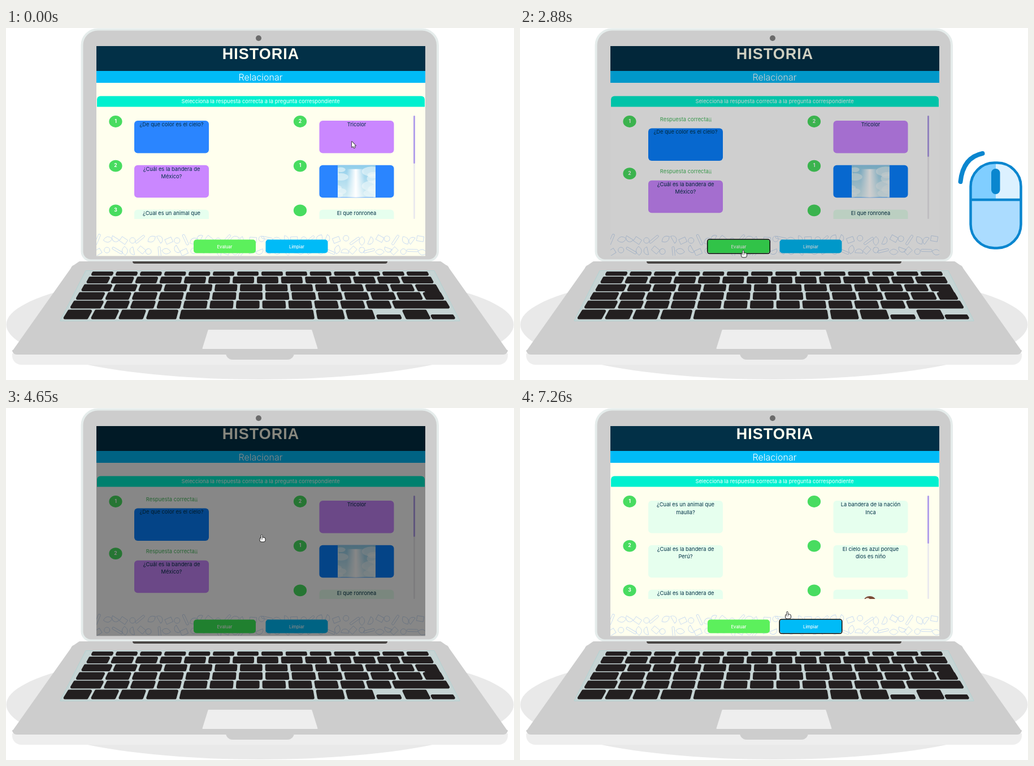
An HTML page with a canvas that plays this animation: 899 px wide and 623 px high, repeating every 7.29 s.

```html
<!DOCTYPE html>
<html lang="es">
<head>
<meta charset="utf-8">
<title>Relacionar</title>
<style>
html, body { margin: 0; width: 100%; height: 100%; overflow: hidden; background: #fff; }
canvas { display: block; }
</style>
</head>
<body>
<canvas id="stage" width="899" height="623"></canvas>
<script>
const W = 899, H = 623, LOOP = 7290;
const stage = document.getElementById('stage').getContext('2d');
let c = stage;

const SANS = 'Inter, "Open Sans", sans-serif';
const TITLE = '"Liberation Sans", Arial, sans-serif';
const INK = '#023047', CREAM = '#ffffee', CYAN = '#00bbf7', GREEN = '#48dc60';
const PURPLE = '#ca87ff', MINT = '#e6ffee', SHELL = '#cdcdcd', RIM = '#e5eceb', KEY = '#231f20';
const LIT = { page: CREAM, blue: '#2a85ff', go: '#5cf05c' };
const DIM = { page: '#fff', blue: '#0880ff', go: '#3cf058' };

// Drawing helpers

function box(x0, y0, x1, y1, r, fill, stroke, lw = 1) {
  c.beginPath();
  c.roundRect(x0, y0, x1 - x0, y1 - y0, r);
  if (fill) { c.fillStyle = fill; c.fill(); }
  if (stroke) { c.strokeStyle = stroke; c.lineWidth = lw; c.stroke(); }
}

function poly(pts, fill, stroke, lw = 1) {
  c.beginPath();
  pts.forEach(p => c.lineTo(...p));
  c.closePath();
  c.lineJoin = 'round';
  c.strokeStyle = stroke;
  c.lineWidth = lw;
  c.stroke();
  c.fillStyle = fill;
  c.fill();
}

// Symmetric trapezoid around a vertical axis
function trapezoid(x, y0, half0, y1, half1, fill, stroke, lw) {
  poly([[x - half0, y0], [x + half0, y0], [x + half1, y1], [x - half1, y1]], fill, stroke, lw);
}

function oval(x, y, rx, ry, fill) {
  c.beginPath();
  c.ellipse(x, y, rx, ry, 0, 0, 7);
  c.fillStyle = fill;
  c.fill();
}

function text(s, x, y, size, fill, weight = 400, align = 'center', family = SANS) {
  c.font = `${weight} ${size}px ${family}`;
  c.textAlign = align;
  c.fillStyle = fill;
  c.fillText(s, x, y + size * 0.355);
}

function line(x0, y0, x1, y1, stroke, lw = 1) {
  c.beginPath();
  c.moveTo(x0, y0);
  c.lineTo(x1, y1);
  c.strokeStyle = stroke;
  c.lineWidth = lw;
  c.stroke();
}

function clipped(x, y, w, h, draw) {
  c.save();
  c.beginPath();
  c.rect(x, y, w, h);
  c.clip();
  draw();
  c.restore();
}

function layer(draw) {
  const cv = document.createElement('canvas');
  cv.width = W;
  cv.height = H;
  c = cv.getContext('2d');
  draw();
  c = stage;
  return cv;
}

function random(seed) {
  return () => (seed = seed * 16807 % 2147483647) / 2147483647;
}

const ramp = (t, a, b) => Math.min(1, Math.max(0, (t - a) / (b - a)));
const easeOut = k => 1 - (1 - k) ** 2;
const within = (t, a, b) => t >= a && t < b;

// Laptop

const AXIS = 449.5;

// Key leaning with the perspective of the deck
function key(x0, x1, y0, y1) {
  const mid = (y0 + y1) / 2, at = (x, y) => [x + (x - AXIS) * 0.0018 * (y - mid), y];
  const r = 2.5;
  poly([at(x0 + r, y0 + r), at(x1 - r, y0 + r), at(x1 - r, y1 - r), at(x0 + r, y1 - r)], KEY, KEY, 2 * r);
}

// Units give the relative key widths; low(i) marks half-height keys
function keyRow(y0, y1, units, low = () => false) {
  const gap = 5, half = 298 + 0.64 * ((y0 + y1) / 2 - 435);
  const unit = (2 * half + gap) / units.reduce((a, b) => a + b);
  let x = AXIS - half;
  units.forEach((u, i) => {
    key(x, x + u * unit - gap, low(i) ? (y0 + y1) / 2 : y0, y1);
    x += u * unit;
  });
}

const units = (first, n, last) => [first, ...Array(n).fill(1), last];

function keyboard() {
  trapezoid(AXIS, 430, 308, 518, 353, '#c6d4d4', '#b4d2d2', 2);
  keyRow(431, 438.5, units(1, 12, 1));
  keyRow(440, 452, units(1, 12, 1.37));
  keyRow(453.5, 466, units(1.25, 12, 0.95));
  keyRow(467.5, 481, units(1.1, 12, 0.8));
  key(742, 768, 454, 481);
  keyRow(482.5, 496.5, units(1.27, 11, 2.2));
  keyRow(498.5, 515.5, [1, 1, 1, 1.2, 5, 1.1, 1.1, 1, 1, 0.95], i => i === 7 || i === 9);
}

const laptop = layer(() => {
  c.fillStyle = '#fff';
  c.fillRect(0, 0, W, H);
  oval(AXIS, 525, 449, 97, '#e9e9e9');
  box(134.5, 2.5, 764, 411.5, [28, 28, 16, 16], SHELL, RIM, 4);
  oval(447, 18, 5, 5, '#6b6b6b');
  trapezoid(AXIS, 415, 319, 424, 332, SHELL, SHELL, 4);
  trapezoid(AXIS, 422, 330, 572, 436, SHELL, SHELL, 4);
  box(224, 413, 675, 417, [0, 0, 4, 4], '#4a4644');
  keyboard();
  trapezoid(AXIS, 535, 91, 567, 101, '#eee', '#eee', 2);
  box(11, 576, 888, 596, [0, 0, 16, 16], '#eee');
  box(11, 570, 888, 578, [0, 0, 8, 8], SHELL);
  box(389, 574, 510, 587, [0, 0, 12, 12], SHELL);
});

// Faint school doodles along the bottom of the page

const SHAPES = [
  () => c.roundRect(-10, -2, 20, 4, 2),
  () => c.arc(0, 0, 5, 0, 6.3),
  () => c.rect(-6, -5, 12, 9),
  () => { c.arc(0, 3, 7, Math.PI, 0); c.closePath(); },
  () => { c.moveTo(-8, 0); c.quadraticCurveTo(0, -10, 8, 0); c.quadraticCurveTo(0, 10, -8, 0); }
];

const doodles = layer(() => clipped(160, 363, 582, 40, () => {
  const rnd = random(11);
  c.strokeStyle = '#c8daf2';
  c.lineWidth = 0.9;
  for (let i = 0; i < 78; i++) {
    c.save();
    c.translate(162 + (i >> 1) * 15 + rnd() * 6, 372 + (i % 2) * 20 + rnd() * 5);
    c.rotate(rnd() * 6.3);
    c.beginPath();
    SHAPES[i * 7 % SHAPES.length]();
    c.stroke();
    c.restore();
  }
}));

// Page

const rowY = i => 164 + i * 78.7;

function bullet(x, y, label) {
  oval(x, y, 11.6, 10.4, GREEN);
  text(label, x, y - 1, 8.6, '#fff', 700);
}

function card(x, y, fill, lines) {
  box(x, y, x + 132, y + 57.5, 6, fill);
  lines.forEach((s, i) => text(s, x + 66, y + 6.5 + i * 13.8, 9.35, INK));
}

// Sky with clouds and a beam of light
function sky(x, y, w, h) {
  clipped(x, y, w, h, () => {
    const rnd = random(5), air = c.createLinearGradient(0, y, 0, y + h);
    air.addColorStop(0, '#8fcdea');
    air.addColorStop(1, '#d6eef4');
    c.fillStyle = air;
    c.fillRect(x, y, w, h);
    for (let i = 0; i < 16; i++) {
      const side = i % 2 ? w : 0, r = 6 + rnd() * 8;
      oval(x + side + (rnd() - 0.5) * 34, y + 8 + i * 3.2, r * 1.4, r * 0.7, '#eef9fa99');
    }
    const beam = c.createLinearGradient(x + 16, 0, x + 48, 0);
    beam.addColorStop(0, '#fff0');
    beam.addColorStop(0.5, '#fff');
    beam.addColorStop(1, '#fff0');
    c.fillStyle = beam;
    c.fillRect(x + 16, y + 7, 32, h);
  });
}

function rightCards(fresh, tone) {
  const x = 554.5, labels = fresh ? ['', '', ''] : ['2', '1', ''];
  labels.forEach((s, i) => bullet(520.5, rowY(i) + 1.5, s));
  if (fresh) {
    card(x, rowY(0), MINT, ['La bandera de la nación', 'Inca']);
    card(x, rowY(1), MINT, ['El cielo es azul porque', 'dios es niño']);
    card(x, rowY(2), MINT, []);
    oval(619, 340, 10, 7, '#7a4a35');
    oval(615, 340, 4, 4, '#e8ddd0');
  } else {
    card(x, rowY(0), PURPLE, ['Tricolor']);
    card(x, rowY(1), tone.blue, []);
    sky(587, rowY(1), 67, 57);
    card(x, rowY(2), MINT, ['El que ronronea']);
  }
}

function leftCards(checked, fresh, tone) {
  const shift = checked ? 13.5 : 0;
  const items = fresh
    ? [[MINT, '¿Cual es un animal que', 'maulla?'], [MINT, '¿Cual es la bandera de', 'Perú?'], [MINT, '¿Cuál es la bandera de']]
    : [[tone.blue, '¿De que color es el cielo?'], [PURPLE, '¿Cuál es la bandera de', 'México?'], [MINT, '¿Cual es un animal que']];
  items.forEach(([fill, ...lines], i) => {
    const y = rowY(i) + i * shift;
    bullet(194, y + 1.5, String(i + 1));
    if (checked) text('Respuesta correcta¡¡', 293.5, y - 2.5, 9.35, '#45b95c');
    card(227, y + shift, fill, lines);
  });
}

function button(x, fill, label, focus) {
  box(x, 374.5, x + 110, 398.5, 5, fill);
  if (focus) box(x - 0.3, 374, x + 110.3, 399.3, 4, null, '#101010', 1.6);
  text(label, x + 55, 387, 7.6, '#fff', 500);
}

function page(t, tone) {
  const checked = within(t, 2640, 6450), fresh = t >= 6450;
  c.fillStyle = tone.page;
  c.fillRect(160, 32, 582, 372);
  c.drawImage(doodles, 0, 0);
  c.fillStyle = INK;
  c.fillRect(160, 32, 582, 44);
  c.fillStyle = CYAN;
  c.fillRect(160, 76, 582, 21);
  c.letterSpacing = '1px';
  text('HISTORIA', 451, 45.5, 27, CREAM, 700, 'center', TITLE);
  c.letterSpacing = '0px';
  text('Relacionar', 450.5, 87, 16, '#fff', 300);
  box(161, 120.5, 741, 139.5, [6, 6, 0, 0], '#00f0cf');
  text('Selecciona la respuesta correcta a la pregunta correspondiente', 450.5, 130, 9.35, '#fff');

  clipped(160, 150, 582, 188, () => {
    leftCards(checked, fresh, tone);
    rightCards(fresh, tone);
    box(721, 155, 724, 338, 1.5, '#ebeaee');
    box(721, 155, 724, checked ? 228 : 240, 1.5, '#b3a0ea');
  });

  button(332, tone.go, 'Evaluar', within(t, 2250, 4380));
  button(459.5, CYAN, 'Limpiar', t >= 6120);
}

function spinner(x, y) {
  const step = Math.PI / 4;
  c.lineWidth = 4;
  for (let i = 0; i < 8; i++) {
    const a = i * step;
    c.beginPath();
    c.arc(x, y, 13.5, a - step / 2, a + step / 2 - 0.08);
    c.strokeStyle = `hsl(202 32% ${72 - 16 * Math.cos(a)}%)`;
    c.stroke();
  }
}

function modal(dy, alpha) {
  c.save();
  c.globalAlpha = alpha;
  c.translate(0, dy);
  box(365.5, 47, 536, 249.5, 2, CREAM, '#55585a');
  text('Resultados', 374, 64, 12.6, INK, 400, 'left');
  text('×', 523.5, 61, 11, '#333');
  line(366, 82.5, 536, 82.5, '#e6e6dc');
  spinner(450.5, 117);
  ['Promedio es: 40', 'No. preguntas: 5', 'No. respuesta correctas: 2']
    .forEach((s, i) => text(s, 450.5, 160 + i * 12.3, 8.4, '#3c4850'));
  line(415, 208.5, 486, 208.5, '#dcdcd4');
  box(424, 217.5, 477, 241, 4, CYAN);
  text('Aceptar', 450.5, 230, 7.6, '#fff', 500);
  c.restore();
}

// Click hint beside the laptop
function mouseHint() {
  const edge = '#0a86cf', x = 842;
  c.save();
  c.beginPath();
  c.roundRect(x - 45, 238, 90, 152, 42);
  c.clip();
  c.fillStyle = '#abdcff';
  c.fillRect(x - 46, 237, 92, 155);
  c.fillStyle = '#80ceff';
  c.fillRect(x - 46, 237, 46, 67);
  c.fillStyle = '#dcf1ff';
  c.fillRect(x, 237, 46, 67);
  c.restore();
  line(x - 45, 304, x + 45, 304, edge, 4.5);
  box(x - 44.5, 238.5, x + 44.5, 389.5, 42, null, edge, 4.5);
  box(x - 8, 249, x + 7.5, 294, 7.5, edge);
  c.beginPath();
  c.moveTo(779.5, 272);
  c.quadraticCurveTo(784, 229, 818.5, 222);
  c.strokeStyle = edge;
  c.lineWidth = 8;
  c.lineCap = 'round';
  c.stroke();
  c.lineCap = 'butt';
}

// Pointer: each move has a start, an end and the spot it reaches
const MOVES = [
  [330, 1410, 443.5, 312],
  [1410, 2250, 395, 393],
  [3600, 4320, 452.5, 224],
  [4680, 5130, 499, 279],
  [5130, 5850, 507, 375],
  [7020, 7250, 473, 360]
];

function pointerAt(t) {
  let x = 612, y = 201;
  for (const [from, to, tx, ty] of MOVES) {
    const k = ramp(t, from, to);
    x += (tx - x) * k;
    y += (ty - y) * k;
  }
  return [x, y];
}

function arrow() {
  poly([[0, 0], [0, 10], [2.3, 8], [4, 11.3], [5.6, 10.6], [4.2, 7.4], [7, 7.2]], '#fff', '#222', 1.6);
}

function hand() {
  box(-3.5, 5, 6.5, 13, 3, '#fff', '#222', 1);
  box(-1.2, 0.3, 1.3, 9, 1.2, '#fff', '#222', 0.9);
  box(-0.7, 5, 0.8, 10, 0, '#fff');
}

function pointer(t) {
  const overButton = within(t, 2040, 3390) || within(t, 4200, 4700) || t >= 5820;
  c.save();
  c.translate(...pointerAt(t));
  overButton ? hand() : arrow();
  c.restore();
}

function draw(t) {
  const dim = 0.47 * (ramp(t, 2700, 3150) - ramp(t, 4680, 5070));
  const show = ramp(t, 2910, 3410), hide = ramp(t, 4380, 4620);
  c.drawImage(laptop, 0, 0);
  clipped(160, 32, 582, 371.5, () => {
    page(t, dim > 0 ? DIM : LIT);
    c.fillStyle = `rgba(0,0,0,${dim})`;
    c.fillRect(160, 32, 582, 372);
    if (show > 0 && hide < 1)
      modal(-50 * (1 - easeOut(show)) - 50 * hide, Math.min(1, show * 1.6) * (1 - hide));
  });
  if (within(t, 2430, 3600) || within(t, 6210, 7020)) mouseHint();
  pointer(t);
}

const start = performance.now();
function tick() {
  draw((performance.now() - start) % LOOP);
  requestAnimationFrame(tick);
}
tick();
</script>
</body>
</html>
```
